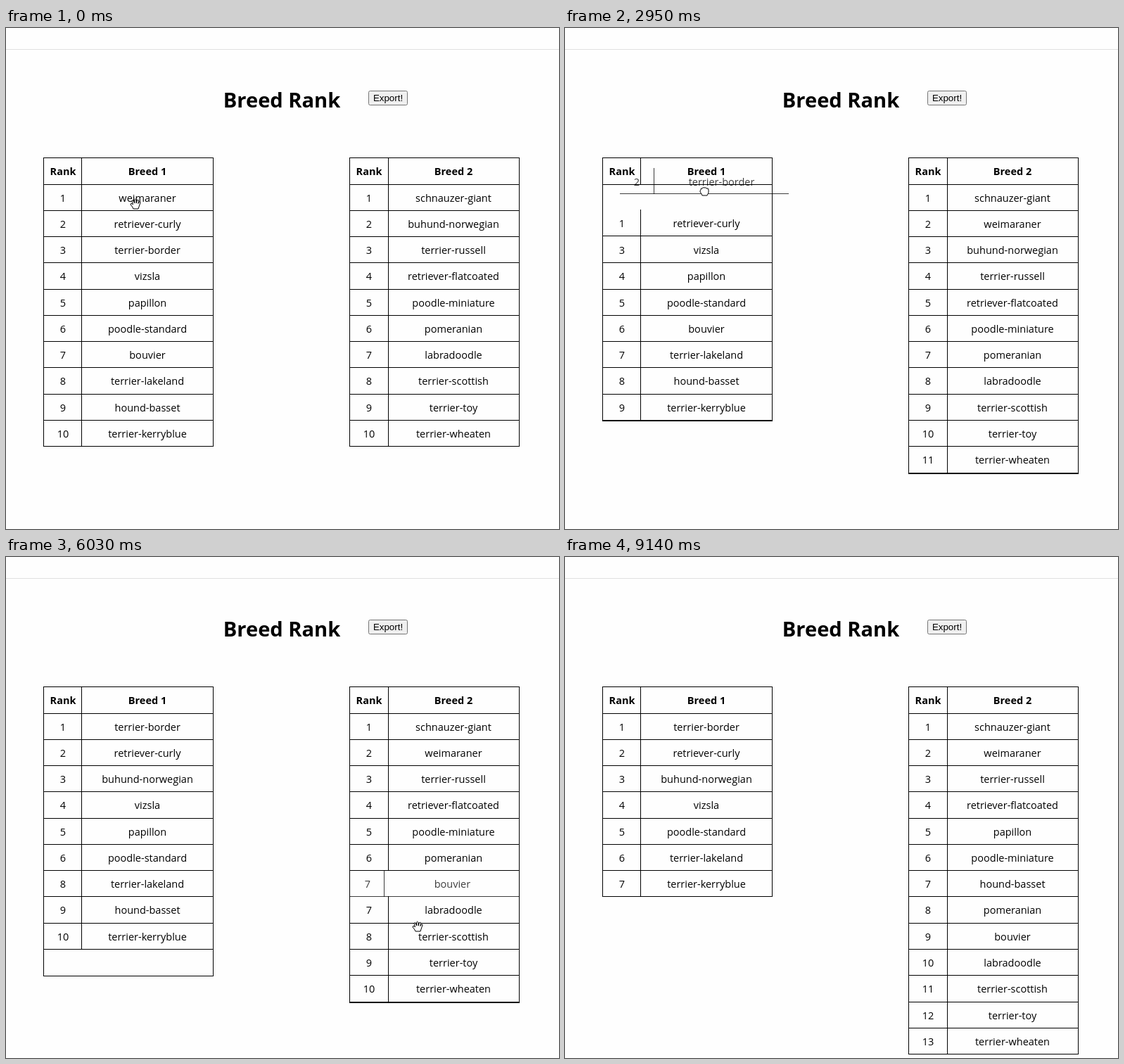
An HTML page with a canvas that plays this animation: 786x712 px, repeating every 9800 ms.

```html
<!DOCTYPE html>
<html lang="en">
<head>
<meta charset="utf-8">
<title>Breed Rank</title>
<style>
html, body { margin: 0; width: 100%; height: 100%; overflow: hidden; background: #fefefe; }
canvas { display: block; }
</style>
</head>
<body>
<canvas id="stage" width="786" height="712"></canvas>
<script>
const ctx = document.getElementById('stage').getContext('2d');
const LOOP = 9800, TICK = 130;
const TOP = 222.1, ROW = 37.27;
const FONT = '14.5px "Open Sans", "Noto Sans", sans-serif';

const tables = [
  { x: 53, split: 107, right: 294, rankX: 81, nameX: 201 },
  { x: 488, split: 543, right: 729, rankX: 516, nameX: 636 }
];
const initial = [
  'weimaraner retriever-curly terrier-border vizsla papillon poodle-standard bouvier terrier-lakeland hound-basset terrier-kerryblue',
  'schnauzer-giant buhund-norwegian terrier-russell retriever-flatcoated poodle-miniature pomeranian labradoodle terrier-scottish terrier-toy terrier-wheaten'
].map(s => s.split(' '));

// from, to: [table, index]; pick, put, away: pointer positions
const drags = [
  { from: [0, 0], to: [1, 1], grab: 810, drop: 1410, pick: [203, 255], put: [583, 297], away: [610, 292] },
  { from: [0, 1], to: [0, 0], grab: 2560, drop: 3050, pick: [174, 292], put: [198, 232], away: [200, 240] },
  { from: [1, 2], to: [0, 2], grab: 4100, drop: 4480, pick: [587, 322], put: [170, 325], away: [164, 330] },
  { from: [0, 6], to: [1, 6], grab: 5490, drop: 5870, pick: [170, 452], put: [610, 452], away: [585, 525] },
  { from: [0, 7], to: [1, 5], grab: 6570, drop: 7200, pick: [196, 508], put: [603, 449], away: [560, 430] },
  { from: [0, 4], to: [1, 4], grab: 7780, drop: 8680, pick: [184, 390], put: [627, 392], away: [640, 400] }
];
// Rows make room shortly before the drop; the lists change once the row has settled
for (const d of drags) {
  d.over = d.drop - 300;
  d.done = d.drop + 320;
}
const lastDone = drags[drags.length - 1].done;

const path = [[790, 184, 250], ...drags.flatMap((d, i) => [
  ...(i ? [[d.grab - 250, ...d.pick]] : []),
  [d.grab, ...d.pick], [d.drop - 110, ...d.put], [d.drop, ...d.put], [d.drop + 140, ...d.away]
])];

const shapes = {
  arrow: 'M0 0V12L3 9.5 5 14 7 13 5 8.8H9Z',
  open: 'M-3 7Q-4 4-7 1Q-7-1-5-.5L-3.5 1-5-4Q-4.5-6-3-5L-1.5-1V-6Q-.5-8 .8-6L1-1 2.5-5.5Q4-6.5 4.5-5L3.8-.5 5.5-3Q7-3.5 7-2L5 4 4 7Z',
  closed: 'M-5-2Q-5-5-3-4Q-2-6 0-5Q2-6 3-4Q6-5 6-2V2Q5 4 4 6H-3Q-4 3-6 1Q-6-2-5-2Z'
};
for (const k in shapes) shapes[k] = new Path2D(shapes[k]);

const lerp = (a, b, p) => a + (b - a) * p;
const easeOut = u => 1 - (1 - Math.min(1, Math.max(0, u))) ** 3;
const smooth = u => u * u * (3 - 2 * u);
const slot = i => TOP + i * ROW;

// The picture advances in even ticks, counted anew from every grab
function snap(t) {
  const start = Math.max(0, ...drags.map(d => d.grab).filter(g => g <= t));
  return start + Math.floor((t - start) / TICK) * TICK;
}

function pointer(t) {
  const i = path.findIndex(k => k[0] > t);
  if (i <= 0) return path.at(i).slice(1);
  const [t0, x0, y0] = path[i - 1], [t1, x1, y1] = path[i];
  const p = smooth((t - t0) / (t1 - t0));
  return [lerp(x0, x1, p), lerp(y0, y1, p)];
}

function text(s, x, y, font = FONT) {
  ctx.font = font;
  ctx.fillText(s, x, y);
}
const hline = (x1, x2, y) => ctx.fillRect(Math.floor(x1), Math.floor(y), Math.floor(x2) - Math.floor(x1) + 1, 1);
const vline = (x, y1, y2) => ctx.fillRect(Math.floor(x), Math.floor(y1), 1, Math.floor(y2) - Math.floor(y1) + 1);

function drawRow(c, y, rank, name, h = ROW) {
  text(rank, c.rankX, Math.floor(y) + 25);
  text(name, c.nameX, Math.floor(y) + 25);
  vline(c.split, y, y + h);
  hline(c.x, c.right, y + h);
}

function drawTable(id, names, drag, t) {
  const c = tables[id];
  const home = drag && drag.from[0] === id, target = drag && drag.to[0] === id;
  const shift = delay => easeOut((t - drag.over - delay) / 200);
  const size = names.length + (target && !home ? shift(0) : 0);
  const bottom = slot(size) + (drag ? 1 : 0);

  text('Rank', c.rankX, 209, 'bold ' + FONT);
  text('Breed ' + (id + 1), c.nameX, 209, 'bold ' + FONT);
  for (const y of [184, TOP, bottom]) hline(c.x, c.right, y);
  for (const x of [c.x, c.right]) vline(x, 184, bottom);
  vline(c.split, 184, TOP);

  names.forEach((name, i) => {
    if (home && i === drag.from[1]) return;
    let move = 0;
    if (drag) {
      const up = home && i > drag.from[1] ? 1 : 0;
      const down = target && i - up >= drag.to[1] ? 1 : 0;
      const nearest = target && i - up === drag.to[1];
      move = (down - up) * shift(nearest ? 60 : 0);
    }
    drawRow(c, slot(i + move), i + 1, name);
  });
}

function drawDragged(drag, name, t) {
  const [px, py] = pointer(Math.min(t, drag.drop));
  const p = easeOut((t - drag.drop) / (drag.done - drag.drop));
  const x = lerp(tables[drag.from[0]].x + 1 + px - drag.pick[0], tables[drag.to[0]].x + 1, p);
  const y = lerp(slot(drag.from[1]) + py - drag.pick[1], slot(drag.to[1]), p);
  ctx.globalAlpha = 0.76;
  drawRow({ x, split: x + 48, right: x + 239, rankX: x + 24, nameX: x + 144.5 }, y, drag.from[1] + 1, name, 36.6);
  ctx.globalAlpha = 1;
}

function drawPointer(t, drag, lists) {
  const [x, y] = pointer(t);
  const over = tables.findIndex(c => x > c.x && x < c.right);
  const row = Math.floor((y - TOP) / ROW);
  const onRow = over >= 0 && row >= 0 && row < lists[over].length;
  const landing = drag && over === drag.to[0] && row === drag.to[1];
  const kind = drag && t < drag.drop ? 'closed' : onRow && !landing ? 'open' : 'arrow';
  ctx.save();
  ctx.translate(Math.round(x), Math.round(y));
  ctx.fillStyle = '#fff';
  ctx.fill(shapes[kind]);
  ctx.stroke(shapes[kind]);
  ctx.restore();
}

function drawPage() {
  ctx.fillStyle = '#fefefe';
  ctx.fillRect(0, 0, 786, 712);
  ctx.fillStyle = '#e0e0e0';
  ctx.fillRect(0, 30, 786, 1);

  ctx.lineWidth = 1;
  ctx.textAlign = 'center';
  ctx.beginPath();
  ctx.roundRect(515.5, 89.5, 55, 20, 2);
  ctx.fillStyle = '#efefef';
  ctx.fill();
  ctx.strokeStyle = '#767676';
  ctx.stroke();

  ctx.fillStyle = ctx.strokeStyle = '#000';
  text('Export!', 543, 104, '13.333px "Liberation Sans", Arial, sans-serif');
  text('Breed Rank', 392, 113, 'bold 29.1px "Open Sans", "Noto Sans", sans-serif');
}

function draw(t) {
  const lists = initial.map(l => l.slice());
  for (const { from, to, done } of drags) {
    if (t >= done) lists[to[0]].splice(to[1], 0, ...lists[from[0]].splice(from[1], 1));
  }
  const drag = drags.find(d => t >= d.grab && t < d.done);

  drawPage();
  lists.forEach((names, id) => drawTable(id, names, drag, t));
  if (drag) drawDragged(drag, lists[drag.from[0]][drag.from[1]], t);
  if (t < lastDone) drawPointer(t, drag, lists);
}

const begin = performance.now();
function frame() {
  draw(snap((performance.now() - begin) % LOOP));
  requestAnimationFrame(frame);
}
frame();
</script>
</body>
</html>
```
